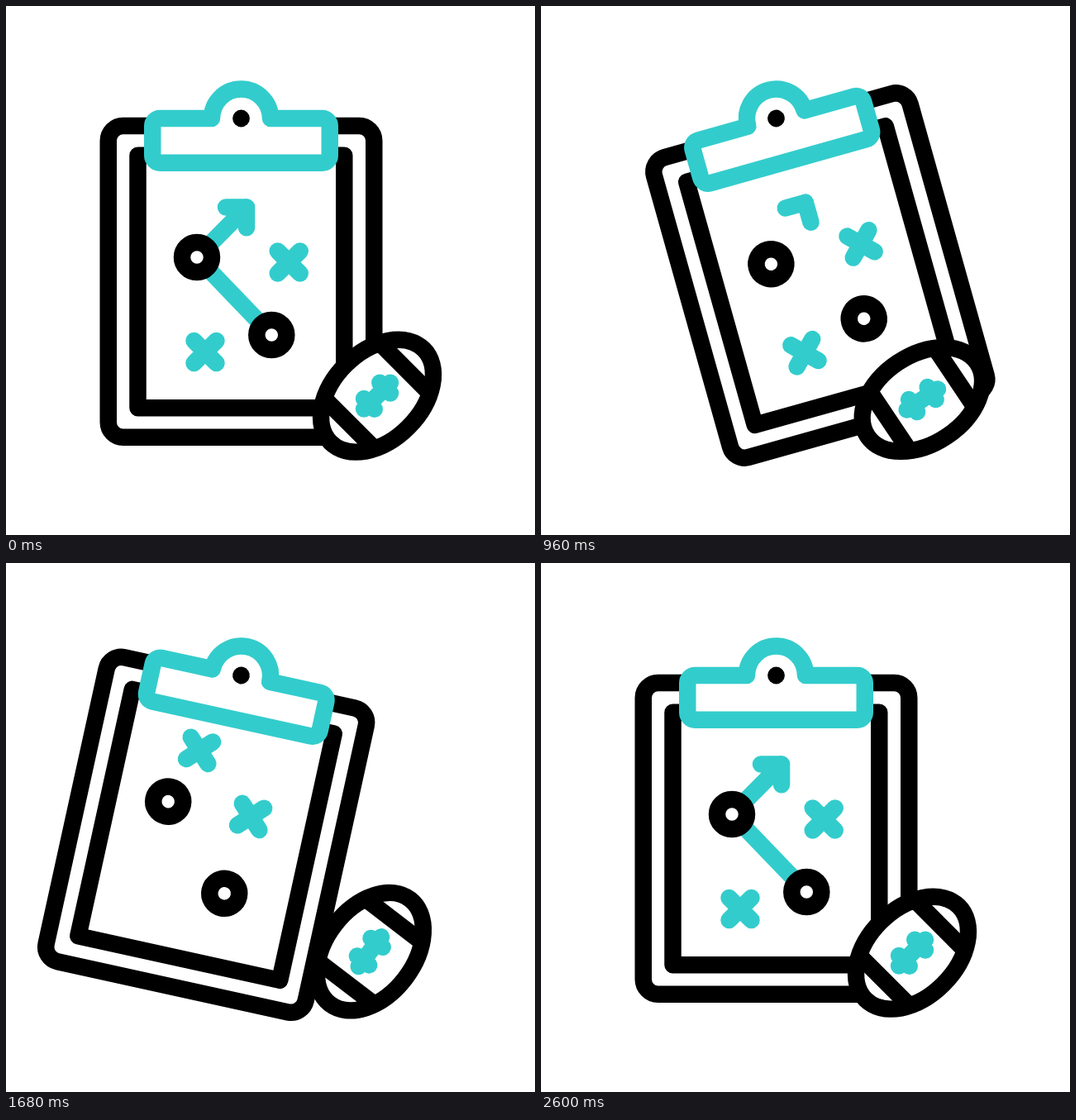
These frames come from a looping animation (640x640 px, 3 s). An HTML page with a canvas:

```html
<!DOCTYPE html>
<html lang="en">
<head>
<meta charset="utf-8">
<title>Game plan</title>
<style>
  html, body { margin: 0; width: 100%; height: 100%; overflow: hidden; background: #fff; }
  canvas { display: block; width: 100%; height: 100%; }
</style>
</head>
<body>
<canvas id="stage" width="640" height="640"></canvas>
<script>
const ctx = document.getElementById('stage').getContext('2d');
const LOOP = 3000, STEP = 40;
const BLACK = '#000', TEAL = '#33cccc', WHITE = '#fff';
const PIN = [284.5, 136];
const BALL_PIVOT = [433, 537];

// Keyframes as [time, value], eased in and out between neighbours.
const tracks = {
  board: [[200, 0], [600, 14.45], [1100, -22.8], [1200, -22.8], [1760, 14.45], [1805, 14.45], [2260, 0]],
  ball: [[600, 0], [1220, 18], [1740, -8.5], [1880, -8.5], [2320, 0]],
  cross: [[1190, 0], [1660, 1], [1790, 1], [2210, 0]],
  routeErase: [[200, 0], [1000, 1]],
  headErase: [[1000, 0], [1200, 1]],
  routeDraw: [[2400, 0], [2580, 1]],
  headDraw: [[2480, 0], [2600, 1]]
};

function valueAt(keys, t) {
  if (t <= keys[0][0]) return keys[0][1];
  for (let i = 1; i < keys.length; i++) {
    const [t0, v0] = keys[i - 1], [t1, v1] = keys[i];
    if (t < t1) {
      const u = (t - t0) / (t1 - t0);
      return v0 + (v1 - v0) * u * u * (3 - 2 * u);
    }
  }
  return keys[keys.length - 1][1];
}

function paint(stroke, fill) {
  if (fill) { ctx.fillStyle = fill; ctx.fill(); }
  if (stroke) { ctx.strokeStyle = stroke; ctx.stroke(); }
}

function line(points, color) {
  ctx.beginPath();
  points.forEach(([x, y]) => ctx.lineTo(x, y));
  paint(color);
}

function circle(x, y, r, stroke, fill) {
  ctx.beginPath();
  ctx.arc(x, y, r, 0, Math.PI * 2);
  paint(stroke, fill);
}

function turned([x, y], degrees, draw) {
  ctx.save();
  ctx.translate(x, y);
  ctx.rotate(degrees * Math.PI / 180);
  ctx.translate(-x, -y);
  draw();
  ctx.restore();
}

// Strokes only the part of a polyline between two fractions of its length.
function trimmedLine(points, from, to, color) {
  if (to - from < 0.001) return;
  const lengths = points.slice(1).map((p, i) => Math.hypot(p[0] - points[i][0], p[1] - points[i][1]));
  const total = lengths.reduce((a, b) => a + b);
  const start = from * total, end = to * total;
  const part = [];
  let done = 0;
  lengths.forEach((len, i) => {
    const a = Math.max(start, done), b = Math.min(end, done + len);
    if (a < b) {
      const [p, q] = [points[i], points[i + 1]];
      for (const s of [a, b]) {
        const k = (s - done) / len;
        part.push([p[0] + (q[0] - p[0]) * k, p[1] + (q[1] - p[1]) * k]);
      }
    }
    done += len;
  });
  line(part, color);
}

function cross(x, y) {
  const r = 13.5;
  line([[x - r, y - r], [x + r, y + r]], TEAL);
  line([[x - r, y + r], [x + r, y - r]], TEAL);
}

function drawClip() {
  const [x, y] = PIN, left = 177.25, right = 391.75, bottom = 189.75, r = 9;
  ctx.beginPath();
  ctx.arc(x, y, 35.5, Math.PI, 0);
  ctx.arcTo(right, y, right, bottom, r);
  ctx.arcTo(right, bottom, left, bottom, r);
  ctx.arcTo(left, bottom, left, y, r);
  ctx.arcTo(left, y, x, y, r);
  ctx.closePath();
  paint(TEAL, WHITE);
  circle(x, y, 10.4, null, BLACK);
}

function drawBoard(t) {
  ctx.beginPath();
  ctx.roundRect(123.75, 145, 321.5, 376.75, 18);
  paint(BLACK, WHITE);
  ctx.beginPath();
  ctx.rect(159.5, 180.75, 249.75, 305.5);
  paint(BLACK);
  drawClip();

  const redraw = t >= 2400;
  const range = name => redraw
    ? [0, valueAt(tracks[name + 'Draw'], t)]
    : [valueAt(tracks[name + 'Erase'], t), 1];
  trimmedLine([[321.3, 398], [231, 304], [291, 243.5]], ...range('route'), TEAL);
  trimmedLine([[266, 243.5], [291, 243.5], [291, 268.3]], ...range('head'), TEAL);

  const k = valueAt(tracks.cross, t);
  cross(342.2 - 87.5 * k, 310 - 74.5 * k);
  cross(241 + 91.5 * k, 418.5 - 118 * k);
  circle(231, 304, 18, BLACK, WHITE);
  circle(321.3, 398, 18, BLACK, WHITE);
}

// Ball lies along its x axis before it is tilted.
function drawBall() {
  ctx.translate(449, 471.7);
  ctx.rotate(-Math.PI / 4);
  ctx.beginPath();
  ctx.ellipse(0, 0, 79.75, 53.5, 0, 0, Math.PI * 2);
  paint(BLACK, WHITE);
  for (const x of [-47.5, 47.5]) line([[x, -40], [x, 40]], BLACK);
  line([[-22.5, 0], [22.5, 0]], TEAL);
  for (const x of [-13.6, 13.6]) line([[x, -9], [x, 9]], TEAL);
}

function render(t) {
  ctx.fillStyle = WHITE;
  ctx.fillRect(0, 0, 640, 640);
  ctx.lineWidth = 20.5;
  ctx.lineCap = ctx.lineJoin = 'round';
  turned(PIN, valueAt(tracks.board, t), () => drawBoard(t));
  turned(BALL_PIVOT, valueAt(tracks.ball, t), drawBall);
}

const begin = performance.now();
function tick() {
  const t = (performance.now() - begin) % LOOP;
  render(Math.floor(t / STEP) * STEP);
  requestAnimationFrame(tick);
}
tick();
</script>
</body>
</html>
```
